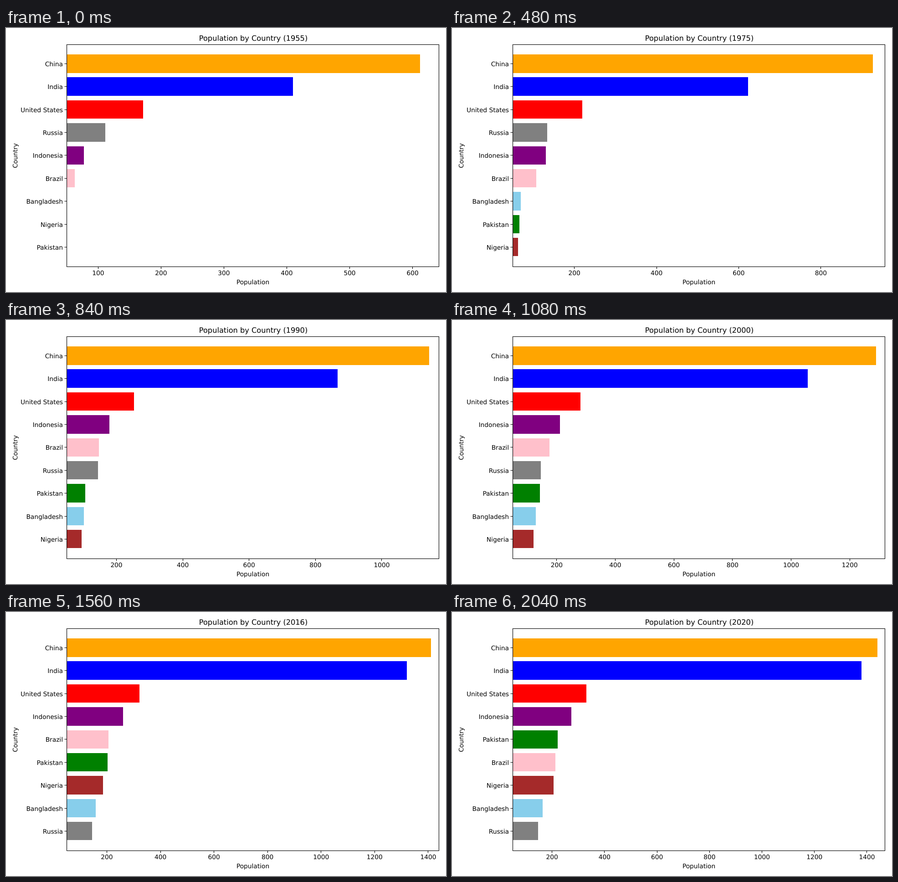
Write an HTML page with a canvas that moves like this. It is 966 px wide and 580 px high and loops after 2160 ms.

```html
<!DOCTYPE html>
<html lang="en">
<head>
<meta charset="utf-8">
<title>Population by Country</title>
<style>
html, body { margin: 0; width: 966px; height: 580px; overflow: hidden; background: #fff; }
canvas { display: block; }
</style>
</head>
<body>
<canvas id="chart" width="966" height="580"></canvas>
<script>
const ctx = document.getElementById('chart').getContext('2d');
const STEP = 120, COUNT = 18;

// Millions of people in the key years; growth is exponential between them.
const KEYS = [1955, 1975, 1985, 2000, 2010, 2020];
const COUNTRIES = [
  ['China', 'orange', 612.2, 926.2, 1075.6, 1290.6, 1368.8, 1439.3],
  ['India', 'blue', 409.9, 623.1, 784.4, 1056.6, 1234.3, 1380],
  ['United States', 'red', 171.7, 219.1, 240.5, 281.7, 309, 331],
  ['Russia', 'gray', 111.4, 133.8, 143, 146.4, 143.5, 145.9],
  ['Indonesia', 'purple', 77.3, 130.7, 165, 211.5, 241.8, 273.5],
  ['Brazil', 'pink', 62.5, 107.2, 135.3, 174.8, 195.7, 212.6],
  ['Pakistan', 'green', 40.4, 66.8, 92.2, 142.3, 179.4, 220.9],
  ['Bangladesh', 'skyblue', 42.1, 70.1, 90.8, 128.4, 149, 164.7],
  ['Nigeria', 'brown', 41.3, 63.4, 83.6, 121.8, 157, 206.1]
];

const LEFT = 133.5, RIGHT = 950.5, TOP = 36.5, BOTTOM = 524.5;
const X_MIN = 50, X_START = 133.3, X_END = 950.8;
const PITCH = 50.36, BAR = 40.5, FIRST = 58.1, TICK = 5;
const snap = v => Math.floor(v) + 0.5;

// Five-year steps up to 2015, then single years.
const yearAt = i => i <= 12 ? 1955 + 5 * i : 2003 + i;

function valueAt(values, year) {
  const i = Math.max(1, KEYS.findIndex(k => k >= year));
  const part = (year - KEYS[i - 1]) / (KEYS[i] - KEYS[i - 1]);
  return values[i - 1] * (values[i] / values[i - 1]) ** part;
}

function text(str, x, y, align = 'center', size = 13.75) {
  ctx.font = size + 'px "DejaVu Sans", sans-serif';
  ctx.textRendering = 'geometricPrecision';
  ctx.textAlign = align;
  ctx.fillText(str, x, y);
}

function line(x1, y1, x2, y2) {
  ctx.beginPath();
  ctx.moveTo(x1, y1);
  ctx.lineTo(x2, y2);
  ctx.stroke();
}

function drawRow({ name, color, value }, y, end) {
  const top = Math.round(y), bottom = Math.round(y + BAR);
  const mid = snap(y + BAR / 2 + 0.2);
  if (value > X_MIN) {
    ctx.fillStyle = color;
    ctx.fillRect(LEFT, top, Math.round(end) - LEFT, bottom - top);
  }
  ctx.fillStyle = '#000';
  line(LEFT - TICK, mid, LEFT, mid);
  text(name, 125, Math.round(mid + 5), 'right');
}

function draw(year) {
  const rows = COUNTRIES
    .map(([name, color, ...values]) => ({ name, color, value: valueAt(values, year) }))
    .sort((a, b) => b.value - a.value);
  const max = rows[0].value + 30;
  const toX = v => X_START + (v - X_MIN) / (max - X_MIN) * (X_END - X_START);

  ctx.fillStyle = '#fff';
  ctx.fillRect(0, 0, 966, 580);
  ctx.strokeStyle = '#000';
  ctx.lineWidth = 1.11;
  rows.forEach((row, i) => drawRow(row, FIRST + i * PITCH, toX(row.value)));

  const step = (max - X_MIN) / 9 > 100 ? 200 : 100;
  for (let v = step; v <= max; v += step) {
    const x = snap(toX(v));
    line(x, BOTTOM, x, BOTTOM + TICK);
    text(v, toX(v), 543);
  }

  ctx.strokeRect(LEFT, TOP, RIGHT - LEFT, BOTTOM - TOP);
  text(`Population by Country (${year})`, 543, 28, 'center', 16.2);
  text('Population', 542, 563);
  ctx.save();
  ctx.translate(25, 280.5);
  ctx.rotate(-Math.PI / 2);
  text('Country', 0, 0);
  ctx.restore();
}

const start = performance.now();
function tick(now) {
  const t = Math.max(0, now - start) % (STEP * COUNT);
  draw(yearAt(Math.floor(t / STEP)));
  requestAnimationFrame(tick);
}
draw(yearAt(0));
requestAnimationFrame(tick);
</script>
</body>
</html>
```
